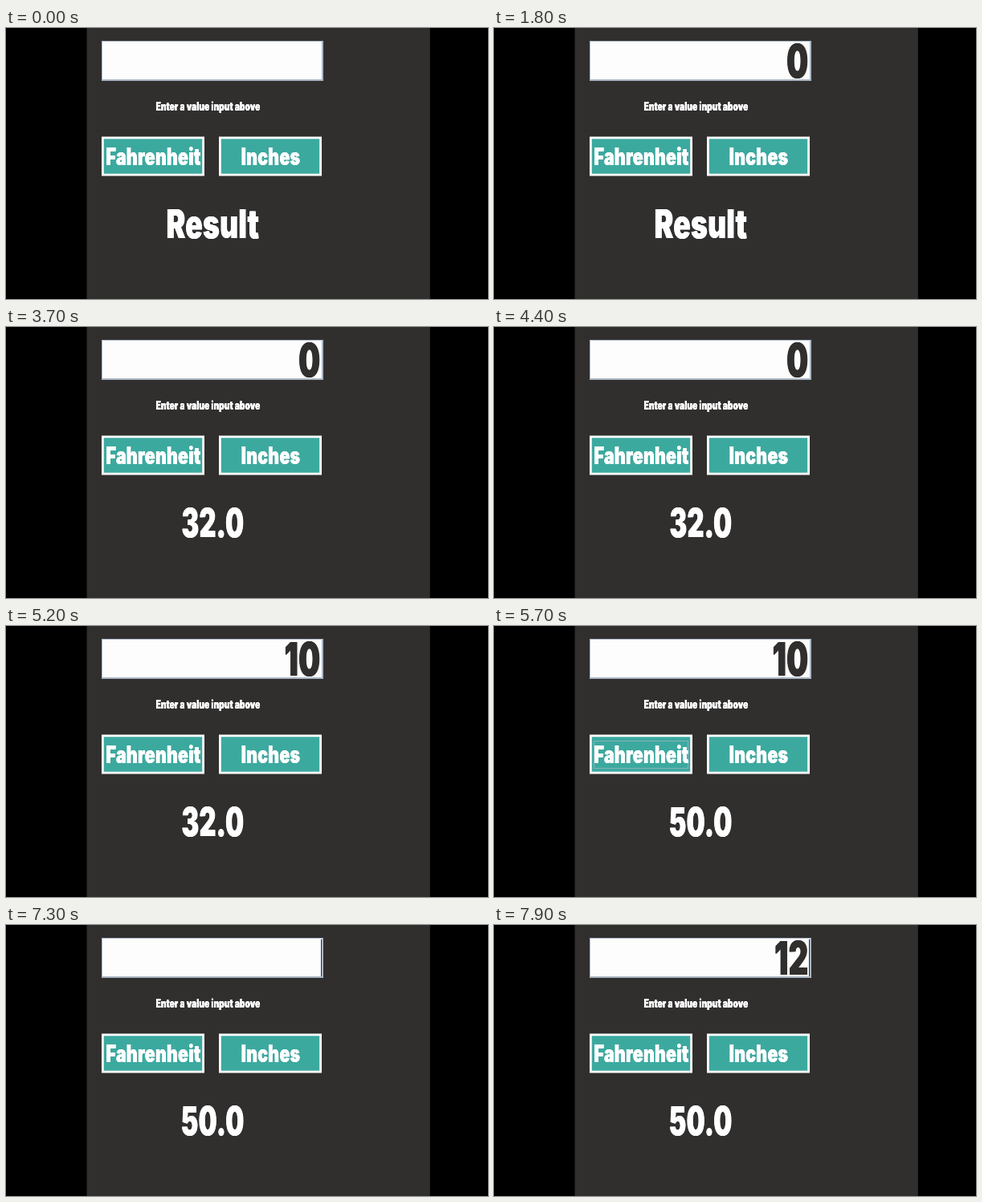
Recreate the animation shown at these times as an HTML page with a canvas. Size 600 px wide and 338 px high, loop 8000 ms.

```html
<!DOCTYPE html>
<html lang="en">
<head>
<meta charset="utf-8">
<title>Unit converter</title>
<style>
  html, body { margin: 0; width: 100%; height: 100%; overflow: hidden; background: #000; }
  canvas { display: block; }
</style>
</head>
<body>
<canvas id="stage" width="600" height="338"></canvas>
<script>
const ctx = document.getElementById('stage').getContext('2d');
const LOOP = 8000;
const DARK = '#312f2e', TEAL = '#3ca99f', WHITE = '#fff';
const EDGE = '#a9b6c4', PRESSED = '#b8cfe5';
const LETTERS = 0.72, DIGITS = 0.66;   // condensed faces
const CAP = 0.727;                     // cap height per em

// Each entry holds from its time until the next one.
const typed = [[0, ''], [1700, '0'], [4600, ''], [4700, '1'], [5200, '10'],
               [7000, '1'], [7200, ''], [7600, '1'], [7800, '12']];
const results = [[0, 'Result'], [2000, '32.0'], [5700, '50.0']];
const caretOn = [[600, 1100], [3900, 4400], [6900, 7400], [7600, 8000]];
const pressed = [[1900, 2000], [5600, 5700]];
const focused = [[1900, 3100], [5600, 6500]];

const valueAt = (track, t) => track.filter(([start]) => start <= t).pop()[1];
const during = (spans, t) => spans.some(([a, b]) => t >= a && t < b);

function box(color, x, y, w, h) {
  ctx.fillStyle = color;
  ctx.fillRect(x, y, w, h);
}

function outline(color, x, y, w, h) {
  ctx.strokeStyle = color;
  ctx.lineWidth = 1;
  ctx.strokeRect(x + 0.5, y + 0.5, w - 1, h - 1);
}

// Heavy condensed lettering, sized by cap height; stems are widened sideways.
function write(text, x, baseline, cap, color, align = 'center') {
  const size = cap / CAP;
  ctx.save();
  ctx.translate(x, baseline);
  ctx.scale(/\d/.test(text) ? DIGITS : LETTERS, 1);
  ctx.font = `900 ${size}px Inter, Roboto, "Open Sans", sans-serif`;
  ctx.letterSpacing = `${0.012 * size}px`;
  ctx.textAlign = align;
  ctx.fillStyle = color;
  for (const shift of [-0.012, 0, 0.012]) ctx.fillText(text, shift * size, 0);
  ctx.restore();
}

function field(text, caret) {
  box(EDGE, 119, 16, 276, 50);
  box('#fdfdfd', 120, 17, 273, 47);
  write(text, 391.5, 62, 41.5, DARK, 'right');
  if (caret) box(DARK, 392, 18, 1, 46);
}

function button(label, x, isDown, hasFocus) {
  box(WHITE, x, 135.5, 128, 49);
  box(isDown ? PRESSED : TEAL, x + 2.8, 138.3, 122.4, 43.4);
  if (hasFocus) outline('#84b3bb', x + 5, 143, 118, 35);
  write(label, x + 64.5, 171, 21.5, WHITE);
}

function draw(t) {
  box('#000', 0, 0, 600, 338);
  box(DARK, 100.6, 0, 427.2, 338);
  field(valueAt(typed, t), during(caretOn, t));
  write('Enter a value input above', 251.5, 103, 10.2, WHITE);
  button('Fahrenheit', 119, during(pressed, t), during(focused, t));
  button('Inches', 265, false, false);
  write(valueAt(results, t), 257.5, 262, 35.5, WHITE);
}

function tick(now) {
  draw(now % LOOP);
  requestAnimationFrame(tick);
}
requestAnimationFrame(tick);
</script>
</body>
</html>
```
